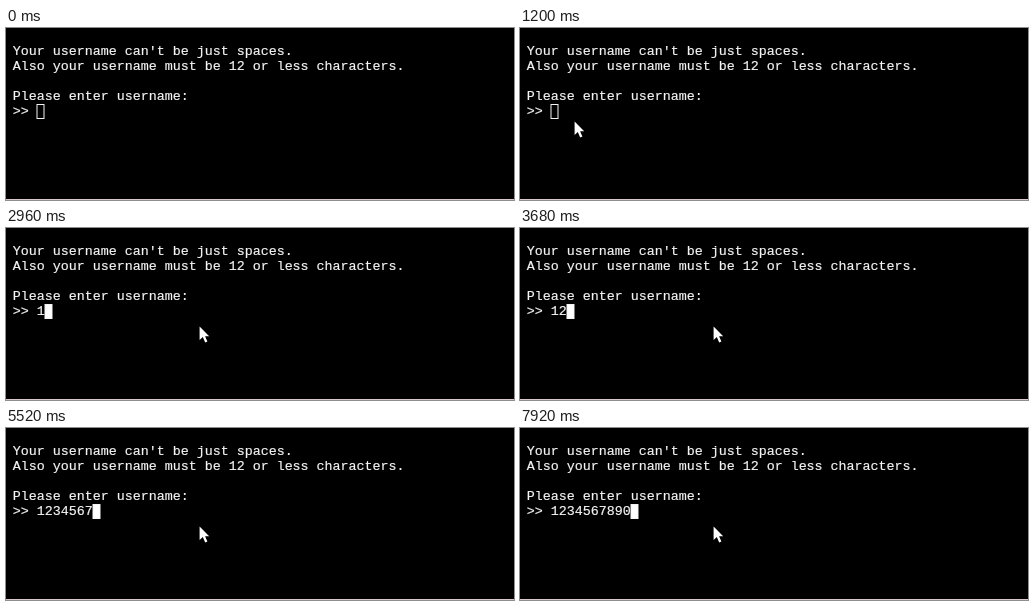
An HTML page for the animation above (8000 ms loop, 508 by 172 pixels).

```html
<!DOCTYPE html>
<html lang="en">
<head>
<meta charset="utf-8">
<title>Username prompt</title>
<style>
  html, body { margin: 0; width: 100%; height: 100%; overflow: hidden; background: #000; }
  svg { display: block; width: 508px; height: 172px; }
  text {
    font: 13.333px "Courier New", "Liberation Mono", monospace;
    fill: #f4f4f4;
    stroke: #f4f4f4;
    stroke-width: .2px;
    white-space: pre;
  }
</style>
</head>
<body>
<svg viewBox="0 0 508 172">
  <rect width="508" height="172" fill="#000"/>
  <rect y="171" width="508" height="1" fill="#d8c8cc"/>
  <text x="6.7" y="27">Your username can't be just spaces.</text>
  <text x="6.7" y="42">Also your username must be 12 or less characters.</text>
  <text x="6.7" y="72">Please enter username:</text>
  <text x="6.7" y="87" id="line">&gt;&gt; </text>
  <rect id="caret" x="31" y="76.5" width="7" height="14" fill="none" stroke="#f4f4f4"/>
  <path id="mouse" d="M0 .5V14L3.2 11L5.6 16.4L7.8 15.4L5.5 10.2H9.6Z" fill="#fff"/>
</svg>
<script>
  const LOOP = 8000, STEP = 80, CHAR = 8, FOCUS = 1760;
  const keys = "1234567890";
  const keyTimes = [2800, 3280, 3760, 4240, 4640, 5040, 5440, 5920, 6480, 7280];
  // Pointer path: time, x, y
  const path = [
    [480, 41, 173], [880, 48, 113], [1200, 54.6, 93], [1280, 58, 93], [1680, 193.6, 98]
  ];
  const line = document.getElementById("line");
  const caret = document.getElementById("caret");
  const mouse = document.getElementById("mouse");

  const ease = u => u * u * (3 - 2 * u);

  function pointerAt(t) {
    if (t <= path[0][0]) return path[0].slice(1);
    for (let i = 1; i < path.length; i++) {
      const [t0, x0, y0] = path[i - 1], [t1, x1, y1] = path[i];
      if (t < t1) {
        const u = ease((t - t0) / (t1 - t0));
        return [x0 + (x1 - x0) * u, y0 + (y1 - y0) * u];
      }
    }
    return path[path.length - 1].slice(1);
  }

  function draw(now) {
    const t = Math.floor((now % LOOP) / STEP) * STEP;
    const typed = keyTimes.filter(k => k <= t).length;
    const [x, y] = pointerAt(t);
    line.textContent = ">> " + keys.slice(0, typed);
    caret.setAttribute("x", 31 + typed * CHAR);
    caret.setAttribute("fill", t >= FOCUS ? "#fff" : "none");
    mouse.setAttribute("transform", `translate(${x} ${y})`);
  }

  let start;
  function tick(now) {
    if (start === undefined) start = now;
    draw(now - start);
    requestAnimationFrame(tick);
  }
  draw(0);
  requestAnimationFrame(tick);
</script>
</body>
</html>
```
